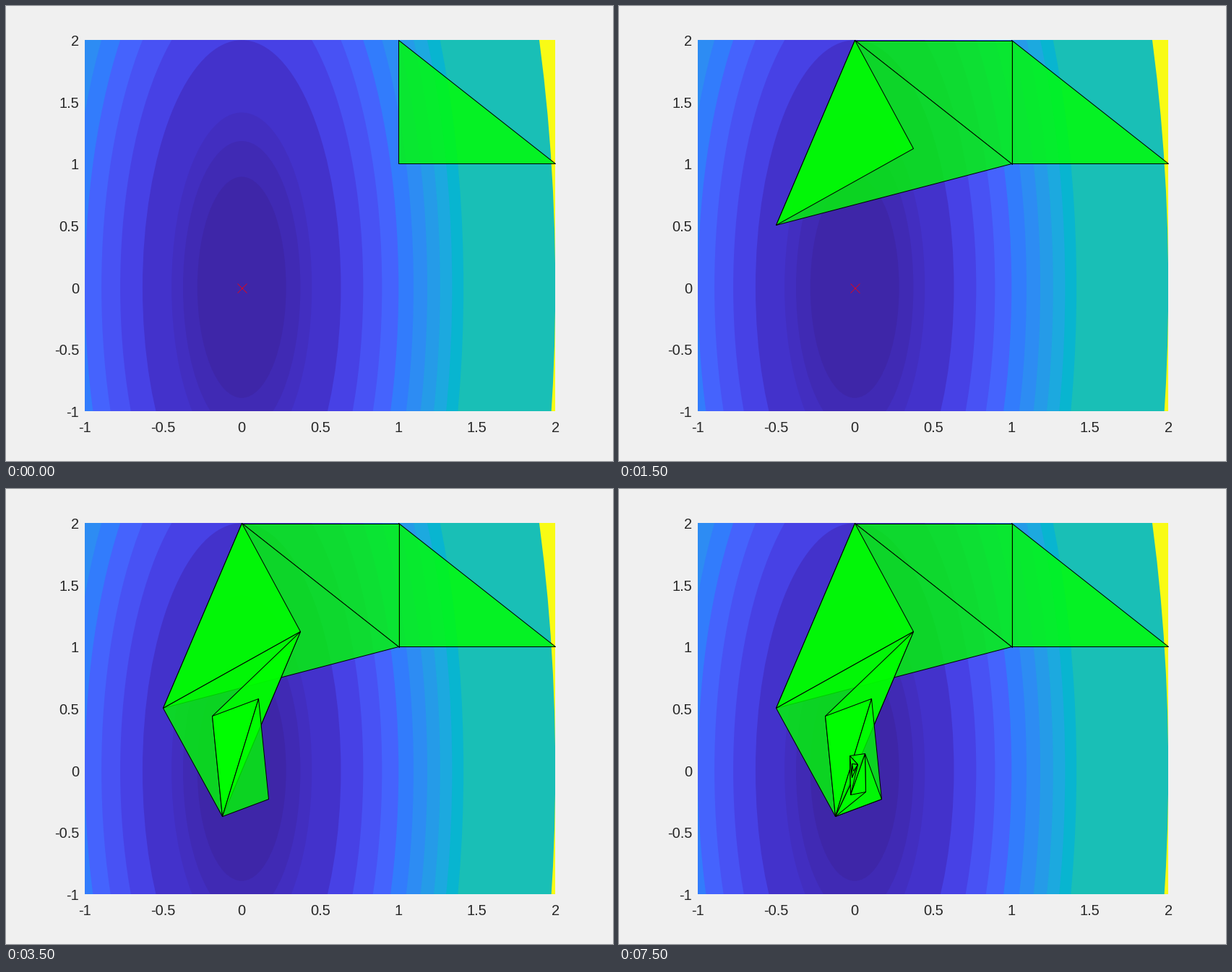
A matplotlib script that plays this animation: 840 px wide and 630 px high, repeating every 8000 ms.

```python
import numpy as np
import matplotlib.pyplot as plt
from matplotlib.animation import FuncAnimation
from matplotlib.patches import Ellipse, Polygon, Rectangle

W, H, DPI = 840, 630, 100
PX = 72 / DPI  # one pixel in points
STEPS, STEP_MS = 16, 500
LEFT, TOP, PLOT_W, PLOT_H = 109.2, 47.25, 651, 513.45

BASE = "#3e26a8"
BANDS = [  # colour of the band just above each contour level
    (0.8, "#402ab4"), (1.4, "#422ec0"), (2, "#4332cb"), (4, "#4741e5"),
    (6, "#4852f4"), (8, "#4563fd"), (10, "#327cfc"), (12, "#2d8cf3"),
    (14, "#259be8"), (16, "#1ca9df"), (18, "#08b5d0"), (20, "#19bfb6"),
    (40, "#f9fb15"),
]


def to_px(x, y):
    return LEFT + (x + 1) / 3 * PLOT_W, TOP + (2 - y) / 3 * PLOT_H


def cost(p):
    return 10 * p[0] ** 2 + p[1] ** 2


def nelder_mead(simplex, steps):
    """Return the simplex at every step of the downhill search."""
    history = [simplex]
    for _ in range(steps - 1):
        best, mid, worst = sorted(history[-1], key=cost)
        centre = (best + mid) / 2
        away = centre - worst
        new = centre + away
        if cost(new) < cost(best):
            far = centre + 2 * away
            if cost(far) < cost(best):
                new = far
        elif cost(new) >= cost(mid):
            side = 0.5 if cost(new) < cost(worst) else -0.5
            new = centre + side * away
        history.append([best, mid, new])
    return history


fig = plt.figure(figsize=(W / DPI, H / DPI), dpi=DPI, facecolor="#f0f0f0")
ax = fig.add_axes([0, 0, 1, 1])
ax.set_xlim(0, W)
ax.set_ylim(H, 0)
ax.axis("off")

# Filled contours, from the outermost level inwards
plot = ax.add_patch(Rectangle((109, 47), 651, 514, fc=BANDS[-1][1], lw=0, zorder=0))
inside = [BASE] + [colour for _, colour in BANDS[:-1]]
for (level, _), colour in reversed(list(zip(BANDS, inside))):
    rx = np.sqrt(level / 10) * PLOT_W / 3
    ry = np.sqrt(level) * PLOT_H / 3
    band = Ellipse(to_px(0, 0), 2 * rx, 2 * ry, fc=colour, lw=0, zorder=1)
    ax.add_patch(band)
    band.set_clip_path(plot)

# Tick labels
font = dict(family="Liberation Sans", fontsize=20 * PX, color="#262626", va="baseline")
for tick in np.arange(-1, 2.5, 0.5):
    x, y = to_px(tick, tick)
    ax.text(x, 590, f"{tick:g}", ha="center", **font)
    if tick <= 2:
        ax.text(101, round(y + 8), f"{tick:g}", ha="right", **font)

cross, = ax.plot(*to_px(0, 0), "x", color="red", ms=13 * PX, mew=0.7 * PX, zorder=2)

start = [np.array(p, float) for p in [(1, 1), (1, 2), (2, 1)]]
triangles = []
for i, simplex in enumerate(nelder_mead(start, STEPS)):
    points = [np.floor(to_px(*p)) + 0.5 for p in simplex]
    triangles.append(ax.add_patch(Polygon(
        points, closed=True, fc=(0, 1, 0, 0.8), ec="black",
        lw=PX, joinstyle="round", zorder=3 + i)))


def update(frame):
    for i, triangle in enumerate(triangles):
        triangle.set_visible(i <= frame)
    cross.set_visible(frame < 4)
    return [cross, *triangles]


anim = FuncAnimation(fig, update, frames=STEPS, interval=STEP_MS, repeat=True)
plt.show()
```
